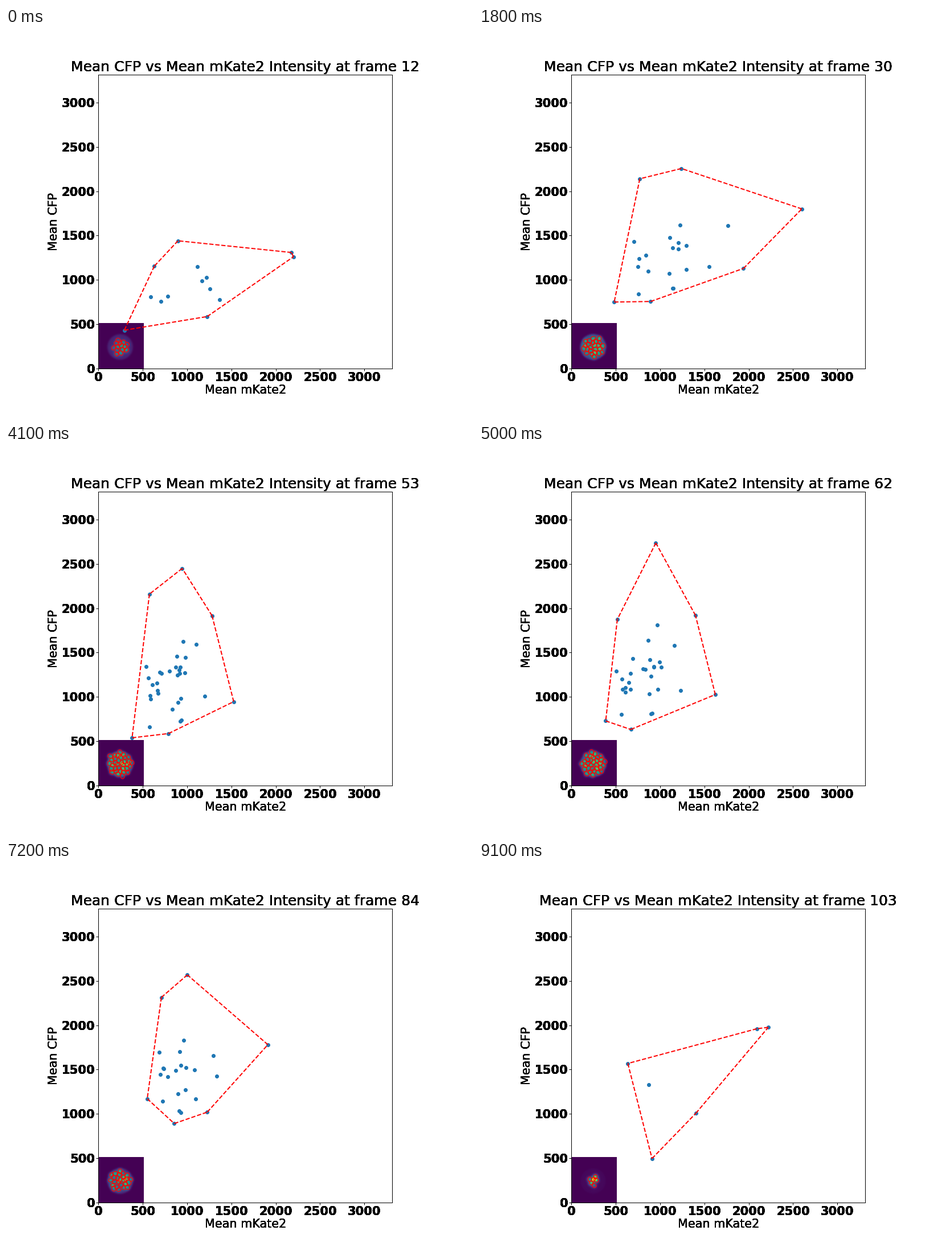
A matplotlib script that plays this animation: 820 by 683 pixels, repeating every 9200 ms.

```python
import matplotlib.pyplot as plt
import numpy as np
from matplotlib.animation import FuncAnimation
from matplotlib.collections import LineCollection

W, H, DPI = 820, 683, 64
PX = 72 / DPI  # points per pixel
FRAMES, FIRST_LABEL = 92, 12
LIMIT, IMAGE_SIZE = 3315, 512
SLOTS, MAX_INNER = 34, 28

# Square axes centred in the usual subplot area.
TOP, BOTTOM = 0.12 * H, 0.875 * H
SIDE = BOTTOM - TOP
MIDDLE = 0.5125 * W
LEFT = MIDDLE - SIDE / 2

rng = np.random.default_rng(7)

# Path of each outer cell (mKate2, CFP) through the key times.
KEY_TIMES = [0, 18, 30, 41, 58, 72, 91]
CORNER_PATHS = {
    "low left": [(292, 431), (482, 749), (453, 887), (379, 537),
                 (392, 897), (550, 1170), (636, 1568)],
    "left": [(630, 1154), (771, 2140), (482, 1176), (575, 2159),
             (466, 1620), (710, 2314), (871, 1330)],
    "top": [(897, 1440), (1240, 2256), (582, 2352), (945, 2449),
            (958, 2992), (1003, 2568), (2092, 1960)],
    "right": [(2179, 1308), (2600, 1800), (2198, 1449), (1282, 1915),
              (1504, 1922), (1912, 1780), (2221, 1976)],
    "low right": [(2201, 1260), (1941, 1128), (1684, 1083), (1526, 945),
                  (1710, 1096), (1228, 1019), (1404, 1006)],
    "bottom": [(1227, 585), (893, 755), (659, 665), (790, 585),
               (562, 672), (855, 890), (909, 495)],
}
INNER_COUNT = [8, 18, 21, 28, 25, 19, 0]

# Inner cells are fixed blends of the outer ones, denser at the lower left.
blend = rng.dirichlet([1.2, 0.8, 0.4, 0.4, 0.8, 0.9], MAX_INNER)


def points_at(frame):
    corners = np.array([[np.interp(frame, KEY_TIMES, axis) for axis in zip(*path)]
                        for path in CORNER_PATHS.values()])
    count = round(np.interp(frame, KEY_TIMES, INNER_COUNT))
    return np.vstack([corners, blend[:count] @ corners])


def turns_left(a, b, c):
    return (b[0] - a[0]) * (c[1] - a[1]) > (b[1] - a[1]) * (c[0] - a[0])


def half_hull(ordered):
    chain = []
    for p in ordered:
        while len(chain) > 1 and not turns_left(*chain[-2:], p):
            chain.pop()
        chain.append(p)
    return chain[:-1]


def hull_edges(points):
    ordered = sorted(map(tuple, points))
    ring = half_hull(ordered) + half_hull(ordered[::-1])
    return list(zip(ring, ring[1:] + ring[:1]))


# Cells of the embryo fill a disc along a sunflower spiral.
slot = np.arange(SLOTS)
slot_radius = 140 * np.sqrt((slot + 0.5) / SLOTS)
cell_size = rng.uniform(21, 27, SLOTS)
cell_glow = rng.uniform(0.1, 0.4, SLOTS)
phase = rng.uniform(0, 2 * np.pi, SLOTS)
theta = np.linspace(0, 2 * np.pi, 25)
grid = (np.arange(80) + 0.5) * IMAGE_SIZE / 80
gx, gy = np.meshgrid(grid, grid)


def cells_at(frame, count):
    angle = 2.4 * slot + 0.6 + 0.012 * frame
    x = 246 + slot_radius * np.cos(angle) + 5 * np.sin(0.5 * frame + phase)
    y = 243 + slot_radius * np.sin(angle) + 5 * np.cos(0.4 * frame + phase)
    return np.column_stack([x, y])[:count]


def outlines(centers):
    shapes = []
    for (x, y), size, p in zip(centers, cell_size, phase):
        r = size * (1 + 0.12 * np.sin(2 * theta + p))
        shapes.append(np.column_stack([x + r * np.cos(theta), y + r * np.sin(theta)]))
    return shapes


def embryo(frame, centers):
    haze = np.interp(frame, [0, 15, 60, 91], [0.1, 0.24, 0.2, 0.02])
    gain = np.interp(frame, [0, 72, 91], [1, 1.2, 2])
    field = haze / (1 + np.exp((np.hypot(gx - 246, gy - 243) - 142) / 6))
    for (x, y), glow in zip(centers, cell_glow):
        field += gain * glow * np.exp(-((gx - x) ** 2 + (gy - y) ** 2) / 700)
    return field


plt.rcParams["font.family"] = "DejaVu Sans"
fig = plt.figure(figsize=(W / DPI, H / DPI), dpi=DPI, facecolor="white")
ax = fig.add_axes([LEFT / W, 1 - BOTTOM / H, SIDE / W, SIDE / H])


def stamp(x, y, text, size, **style):
    """Overprinted text at a pixel position, which gives it dark, hard edges."""
    return [fig.text(x / W, 1 - y / H, text, fontsize=size * PX, **style)
            for _ in range(6)]


image = ax.imshow(np.zeros((80, 80)), cmap="viridis", vmin=0, vmax=1, origin="lower",
                  extent=(0, IMAGE_SIZE, 0, IMAGE_SIZE), aspect="auto", zorder=0)
contours = LineCollection([], colors="red", linewidths=1.3 * PX, zorder=1.5)
hull = LineCollection([], colors="red", linewidths=2 * PX,
                      linestyles=[(0, (3.7, 1.6))], zorder=3)
ax.add_collection(contours, autolim=False)
ax.add_collection(hull, autolim=False)
dots, = ax.plot([], [], "o", color="tab:blue", markersize=6 * PX,
                markeredgewidth=PX, zorder=2)

ticks = range(0, 3001, 500)
ax.set(xlim=(0, LIMIT), ylim=(0, LIMIT), xticks=ticks, yticks=ticks)
ax.tick_params(length=3.65 * PX, width=PX, labelbottom=False, labelleft=False)
for spine in ax.spines.values():
    spine.set_linewidth(PX)

scale = SIDE / LIMIT
for v in ticks:
    stamp(LEFT + v * scale, 604.2, str(v), 21, weight="bold", ha="center", va="top")
    stamp(156.2, BOTTOM - v * scale, str(v), 21, weight="bold",
          ha="right", va="center_baseline")
stamp(MIDDLE, 642, "Mean mKate2", 20.8, ha="center", va="baseline")
stamp(90, (TOP + BOTTOM) / 2, "Mean CFP", 20.8, rotation=90, rotation_mode="anchor",
      ha="center", va="baseline")
titles = stamp(MIDDLE, 75.75, "", 25, ha="center", va="baseline")


def update(frame):
    points = points_at(frame)
    centers = cells_at(frame, len(points))
    image.set_data(embryo(frame, centers))
    contours.set_segments(outlines(centers))
    dots.set_data(points[:, 0], points[:, 1])
    hull.set_segments(hull_edges(points))
    for title in titles:
        title.set_text(f"Mean CFP vs Mean mKate2 Intensity at frame {FIRST_LABEL + frame}")
    return [image, contours, dots, hull, *titles]


anim = FuncAnimation(fig, update, frames=FRAMES, interval=100, repeat=True,
                     repeat_delay=0, blit=False)
plt.show()
```
